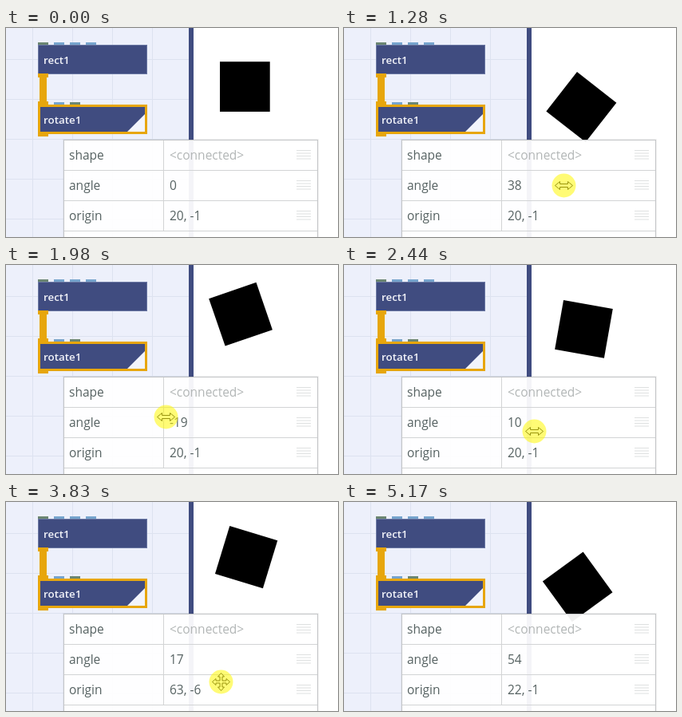
Animation, 416 px wide and 262 px high, one loop 5.72 s. Source, as an HTML page:

```html
<!DOCTYPE html>
<html lang="en">
<head>
<meta charset="utf-8">
<title>Rotating a shape with node parameters</title>
<style>
  html, body { margin: 0; width: 100%; height: 100%; overflow: hidden; background: #fff; }
  svg { display: block; }
  text { font: 15.5px "Open Sans", "Noto Sans", sans-serif; fill: #566262; }
  .node { font-size: 13.4px; font-weight: 600; fill: #f4f5fa; }
  .muted { fill: #b2b6b6; }
  #halo { fill: #fff800; fill-opacity: .54; }
  #cursor { fill: #fff; stroke: #222; }
</style>
</head>
<body>
<svg width="416" height="262" viewBox="0 0 416 262">
  <defs>
    <pattern id="grid" x="33" y="39" width="50" height="50" patternUnits="userSpaceOnUse">
      <path d="M.5 0V50M0 .5H50" stroke="#dde2f0"/>
    </pattern>
    <path id="menu" d="M364 -5.5h18M364 -2h18M364 1.500h18M364 5h18" stroke="#dee0e0"/>
  </defs>

  <rect width="416" height="262" fill="#fff"/>
  <rect id="square" x="268" y="42.200" width="62.700" height="62.700"/>

  <rect width="230" height="262" fill="#edf0fb"/>
  <rect width="230" height="262" fill="url(#grid)"/>
  <rect x="229" width="6" height="262" fill="#404c80"/>

  <g fill="#76a4cd">
    <path d="M60 18h13v3h-13zM80 18h13v3h-13zM100 18h13v3h-13zM60 93h13v3h-13z"/>
    <path d="M40 18h13v3h-13zM80 93h13v3h-13z" fill="#6b8672"/>
  </g>
  <rect x="40.500" y="21.500" width="136" height="36" fill="#404c80" stroke="#6a77a3"/>
  <rect x="41.500" y="97.500" width="134" height="34" fill="#404c80"/>
  <path d="M174 108V130H152z" fill="#f2f4fc"/>
  <rect x="41.500" y="97.500" width="134" height="34" fill="none" stroke="#e7a60c" stroke-width="3"/>
  <path d="M40 57h13v5h-2v30h2v5h-13v-5h2v-30h-2zM40 132h13v4h-13z" fill="#e7a60c"/>
  <text class="node" x="47" y="45">rect1</text>
  <text class="node" x="47" y="120">rotate1</text>

  <path d="M72.500 270V140.500H390.500V270" fill="none" stroke="#000" stroke-opacity=".05" stroke-width="3"/>
  <rect x="72.500" y="140.500" width="318" height="140" fill="#fff" fill-opacity=".94" stroke="#c4c6c8"/>
  <path d="M73 178.500H390M73 216.500H390M73 254.500H390M197.500 141V254" stroke="#d2d4d5"/>
  <text x="79" y="165">shape</text>
  <text x="79" y="203">angle</text>
  <text x="79" y="241">origin</text>
  <text class="muted" x="205" y="165">&lt;connected&gt;</text>
  <text id="angle" x="205" y="203"></text>
  <text id="origin" x="205" y="241"></text>
  <use href="#menu" y="159"/>
  <use href="#menu" y="197"/>
  <use href="#menu" y="235"/>

  <g id="pointer">
    <g id="cursor">
      <path id="sideways" d="M-11 0L-5-5V-2H5V-5L11 0L5 5V2H-5V5Z"/>
      <path id="allways" d="M0-11L4-6.500H1.500V-1.500H6.500V-4L11 0L6.500 4V1.500H1.500V6.500H4L0 11L-4 6.500H-1.500V1.500H-6.500V4L-11 0L-6.500-4V-1.500H-1.500V-6.500H-4Z"/>
    </g>
    <circle id="halo" r="15"/>
  </g>
</svg>
<script>
const LOOP = 5720, START = 120, STEP = 77.2, LAST_STEP = 65;
const DEGREES_PER_PIXEL = 0.76, UNITS_PER_PIXEL = 0.9, SCALE = 1.25;
const $ = id => document.getElementById(id);

// Each gesture moves the pointer to (x, y); a drag also changes its parameter.
const gestures = [
  { from: 0, to: 7, x: 225, y: 198 },
  { from: 9, to: 16, x: 277.6, y: 197, drag: "angle" },
  { from: 16, to: 25, x: 197.4, y: 190, drag: "angle" },
  { from: 25, to: 32, x: 247.4, y: 212, drag: "angle" },
  { from: 32, to: 34, x: 233, y: 285 },
  { from: 35, to: 38, x: 221, y: 230 },
  { from: 40, to: 45, x: 314.4, y: 219, drag: "origin" },
  { from: 45, to: 51, x: 223.2, y: 230, drag: "origin" },
  { from: 53, to: 55, x: 220, y: 209 },
  { from: 56, to: 62, x: 268.7, y: 209, drag: "angle" }
];

const clamp = u => Math.min(1, Math.max(0, u));
const ease = u => (1 - Math.cos(Math.PI * clamp(u))) / 2;

function stateAt(step) {
  const state = { x: 312, y: 258, angle: 0, ox: 20, oy: -1, pressed: false };
  for (const { from, to, x, y, drag } of gestures) {
    const u = ease((step - from) / (to - from));
    const dx = (x - state.x) * u, dy = (y - state.y) * u;
    state.x += dx;
    state.y += dy;
    if (drag === "angle") state.angle += dx * DEGREES_PER_PIXEL;
    if (drag === "origin") {
      state.ox += dx * UNITS_PER_PIXEL;
      state.oy += dy * UNITS_PER_PIXEL;
    }
    if (drag && step >= from && step < to) state.pressed = true;
  }
  return state;
}

const show = (id, on) => $(id).setAttribute("visibility", on ? "visible" : "hidden");
const place = (id, transform) => $(id).setAttribute("transform", transform);

function draw(time) {
  const step = Math.floor((time % LOOP - START) / STEP);
  const state = stateAt(step);
  const [x, y, angle, ox, oy] = [state.x, state.y, state.angle, state.ox, state.oy].map(Math.round);

  $("angle").textContent = angle;
  $("origin").textContent = `${ox}, ${oy}`;
  place("square", `rotate(${angle} ${236.3 + ox * SCALE} ${84.7 + oy * SCALE})`);

  const visible = step >= 0 && step < LAST_STEP;
  place("pointer", `translate(${x + 0.5} ${y + 0.5})`);
  show("halo", state.pressed);
  show("sideways", visible && y < 216);
  show("allways", visible && y >= 216);
}

let begin;
function tick(now) {
  begin ??= now;
  draw(now - begin);
  requestAnimationFrame(tick);
}
draw(0);
requestAnimationFrame(tick);
</script>
</body>
</html>
```
